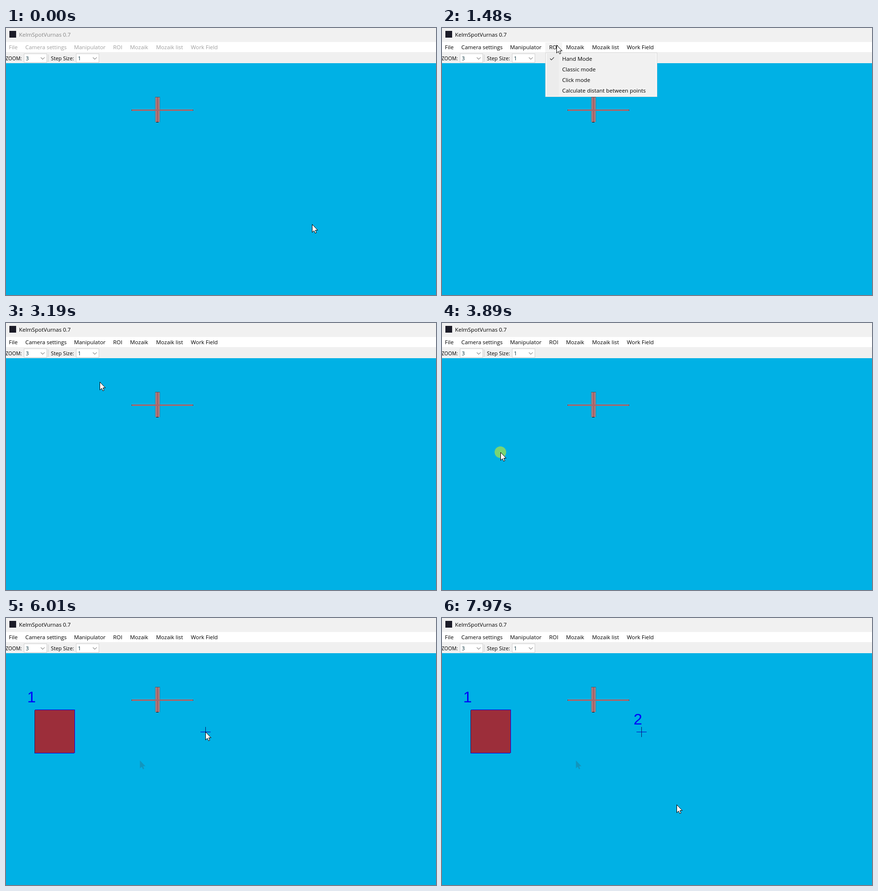
An HTML page with a canvas that plays this animation: 891x554 px, repeating every 8 s.

```html
<!DOCTYPE html>
<html lang="en">
<head>
<meta charset="utf-8">
<title>Work field</title>
<style>
html, body { margin: 0; width: 100%; height: 100%; overflow: hidden; background: #00b1e5; }
canvas { display: block; }
</style>
</head>
<body>
<canvas id="stage" width="891" height="554"></canvas>
<script>
const ctx = document.getElementById('stage').getContext('2d');
const LOOP = 8000;
const UI = '"Open Sans", "Noto Sans", sans-serif';
const MENUS = { 'File': 6, 'Camera settings': 40, 'Manipulator': 141, 'ROI': 222,
  'Mozaik': 257, 'Mozaik list': 311, 'Work Field': 383 };
const MODES = ['Hand Mode', 'Classic mode', 'Click mode', 'Calculate distant between points'];

const linear = k => k;
const easeOut = k => k * (2 - k);
const smooth = k => k * k * (3 - 2 * k);

// Each move bends from the last resting point towards `via` and ends at `to`
const HOME = [634, 407];
const MOVES = [
  { start: 60, end: 230, to: [303, 140], ease: linear },
  { start: 450, end: 1110, to: [236, 32], ease: easeOut },
  { start: 1410, end: 1880, to: [252, 81], ease: smooth },
  { start: 3010, end: 3520, via: [150, 160], to: [59, 190], ease: smooth },
  { start: 3580, end: 4110, via: [79, 249], to: [141, 279], ease: easeOut },
  { start: 4700, end: 5630, via: [422, 328], to: [413, 236], ease: smooth },
  { start: 6290, end: 6930, to: [323, 324], ease: smooth },
  { start: 7720, end: 7970, via: [272, 485], to: [486, 387], ease: smooth }
];
const MENU_OPEN = 1160, MENU_READY = 1420, MENU_CLOSE = 2740;
const PRESSES = [[2550, MENU_CLOSE], [3560, 4360], [5600, 5910], [7240, 7370]];

const within = (t, a, b) => t >= a && t < b;

function pointerAt(t) {
  let from = HOME;
  for (const { start, end, via, to, ease } of MOVES) {
    if (t < start) break;
    if (t < end) {
      const k = ease((t - start) / (end - start));
      const mix = (a, b) => a + (b - a) * k;
      return from.map((a, i) => Math.round(
        via ? mix(mix(a, via[i]), mix(via[i], to[i])) : mix(a, to[i])));
    }
    from = to;
  }
  return from;
}

function rect(color, x, y, w, h) {
  ctx.fillStyle = color;
  ctx.fillRect(x, y, w, h);
}

function text(str, x, y, color = '#000', size = 11.4, family = UI) {
  ctx.font = `${size}px ${family}`;
  ctx.fillStyle = color;
  ctx.fillText(str, x, y);
}

function line(color, width, ...pts) {
  ctx.strokeStyle = color;
  ctx.lineWidth = width;
  ctx.beginPath();
  for (let i = 0; i < pts.length; i += 2) ctx.lineTo(pts[i], pts[i + 1]);
  ctx.stroke();
}

function combo(x, value) {
  rect('#d0d0d0', x, 53, 48, 19);
  rect('#fff', x + 1, 54, 46, 17);
  text(value, x + 4, 67, '#002b36', 10.9);
  line('#555', 1, x + 35, 61, x + 39, 65, x + 43, 61);
}

function windowBars(t) {
  rect('#f1f1f1', 0, 0, 891, 29);
  rect('#1c1c28', 7, 6, 14, 14);
  text('KelmSpotVurnas 0.7', 27, 18, t < 1110 ? '#878787' : '#000');

  rect('#fff', 0, 29, 891, 21);
  if (within(t, 1050, MENU_CLOSE)) rect('#f4f4f4', 214, 30, 35, 20);
  const ink = t < MENU_READY ? '#9f9f9f' : '#000';
  for (const label in MENUS) text(label, MENUS[label], 44, ink);

  rect('#f0f0f0', 0, 50, 891, 23);
  text('ZOOM:', -1, 67, '#000', 10.3);
  combo(37, '3');
  rect('#cfcfcf', 87, 55, 1, 15);
  text('Step Size:', 93, 67, '#000', 10.8);
  combo(145, '1');
}

function crossBars() {
  const red = '#a9666b';
  rect('#4d5a64', 309, 143, 10, 52);
  rect('#b4b9be', 310, 144, 8, 51);
  rect(red, 311, 144, 6, 51);
  rect('#111', 311, 195, 5, 1);
  rect(red, 260, 169, 128, 3);
  for (const x of [260, 387]) rect('#14242c', x, 170, 1, 1);
}

function dropdown(t) {
  ctx.globalAlpha = t < MENU_READY ? .5 : 1;
  rect('#d8d8d8', 214, 51, 232, 92);
  rect('#f9f9f9', 215, 52, 230, 90);
  rect('#f1f1f1', 217, 53, 226, 88);
  rect('#ececec', 217, 53, 25, 88);
  if (t >= 2220) rect('#91c9f7', 217, 74, 225, 22);
  MODES.forEach((mode, i) => text(mode, 249, 68 + 22 * i));
  line('#222', 1.1, 224, 63.5, 226.8, 66.3, 232, 60.8);
  ctx.globalAlpha = 1;
}

function selection(t) {
  if (t < 3980) return;
  const [x, y] = t < 4110 ? pointerAt(t) : [142, 280];
  if (t >= 4360) rect('#9c2e3a', 60, 191, 83, 89);
  line('#0000f0', 1, 61, 190.5, x + .5, 190.5, x + .5, y - 2, x - 1, y + .5, 59.5, y + .5);
  line('#2a1560', 1, 59.5, y + .5, 59.5, 191.5, 61, 190.5);
}

function marks(t) {
  const number = (n, x, y) => text(n, x, y, '#0000fa', 32, '"Liberation Sans", Arial, sans-serif');
  if (t >= 5540) number('1', 44, 175);
  if (t >= 6010) {
    rect('#0a1a60', 413, 226, 1, 21);
    rect('#0800c0', 403, 236, 21, 1);
  }
  if (t >= 6400) number('2', 397, 221);
}

function arrow(x, y, ghost) {
  const outline = new Path2D('M0 0V16.5L3.8 13L6.2 18.3L8.8 17.2L6.5 12H11.4Z');
  ctx.save();
  ctx.translate(x + .5, y + .5);
  ctx.fillStyle = ghost ? '#1295bd' : '#fff';
  ctx.fill(outline);
  ctx.strokeStyle = '#000';
  ctx.lineWidth = 1;
  if (!ghost) ctx.stroke(outline);
  ctx.restore();
}

function pointer(t) {
  const [x, y] = pointerAt(t);
  if (PRESSES.some(([a, b]) => within(t, a, b))) {
    ctx.fillStyle = '#78d475';
    ctx.beginPath();
    ctx.arc(x, y, 12, 0, Math.PI * 2);
    ctx.fill();
  }
  arrow(x, y);
}

function draw(t) {
  rect('#00b1e5', 0, 0, 891, 554);
  windowBars(t);
  crossBars();
  selection(t);
  marks(t);
  if (t >= 5060) arrow(277, 295, true);
  if (within(t, MENU_OPEN, MENU_CLOSE)) dropdown(t);
  pointer(t);
}

const began = performance.now();
function tick() {
  draw((performance.now() - began) % LOOP);
  requestAnimationFrame(tick);
}
tick();
</script>
</body>
</html>
```
